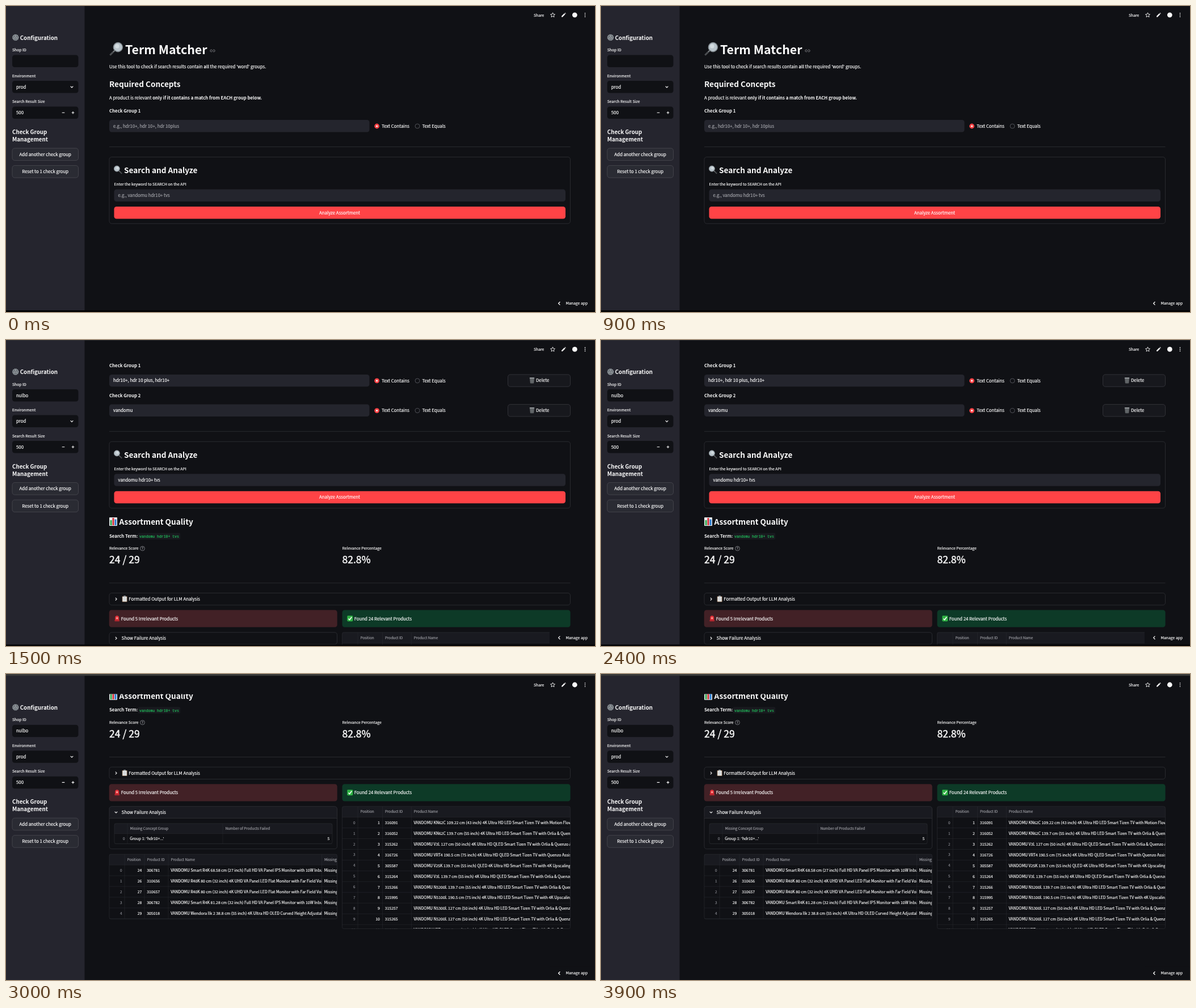
These frames come from a looping animation (1038x540 px, 4500 ms). An HTML page:

```html
<!DOCTYPE html>
<html lang="en">
<head>
<meta charset="utf-8">
<title>Term Matcher</title>
<style>
html, body { margin: 0; width: 100%; height: 100%; overflow: hidden; background: #101115; }
svg { display: block; width: 1038px; height: 540px; }
text { font-family: "Noto Sans CJK JP", "Noto Sans CJK SC", "Noto Sans CJK", "Open Sans", sans-serif; white-space: pre; }
text.code { font-family: "Liberation Mono", monospace; }
</style>
</head>
<body>
<svg id="stage" viewBox="0 0 1038 540" xmlns="http://www.w3.org/2000/svg"></svg>
<script>
const BG = '#101115', SIDE = '#25252e', FIELD = '#24252d', LINE = '#3a3b40', PANEL = '#191a20';
const WHITE = '#fafafa', GREY = '#a0a1a7', RED = '#ff4346', GREEN = '#21c05c';
const BODY = 7.8, SMALL = 6.82, CELL = 6.9, COLHEAD = 6.35, HEAD = 13.6, SIDEHEAD = 9.75;
const LOOP = 4500, STEP = 1500;
const BRAND = 'vandomu', QUERY = BRAND + ' hdr10+ tvs';

// Text is placed by the middle of its capitals; regular weight gets a thin outline.
const text = (x, cy, s, size = BODY, { w = 400, fill = WHITE, a = 'start', cls = '' } = {}) =>
  `<text class="${cls}" x="${x}" y="${(cy + size * .367).toFixed(2)}" font-size="${size}" font-weight="${w}" fill="${fill}" stroke="${fill}" stroke-width="${w > 400 ? 0 : size * .025}" text-anchor="${a}">${s}</text>`;
const bold = s => `<tspan font-weight="700" stroke-width="0">${s}</tspan>`;
const box = (x1, y1, x2, y2, fill = 'none', stroke = 'none', r = 4.3) =>
  `<rect x="${x1}" y="${y1}" width="${x2 - x1}" height="${y2 - y1}" rx="${r}" fill="${fill}" stroke="${stroke}" stroke-width=".6"/>`;
const line = (x1, y1, x2, y2, stroke = LINE, w = .6) =>
  `<path d="M${x1} ${y1}L${x2} ${y2}" stroke="${stroke}" stroke-width="${w}"/>`;
const path = (d, stroke = WHITE, w = 1.1, fill = 'none') =>
  `<path d="${d}" fill="${fill}" stroke="${stroke}" stroke-width="${w}" stroke-linejoin="round"/>`;
const circle = (x, y, r, fill, stroke = 'none', w = .7) =>
  `<circle cx="${x}" cy="${y}" r="${r}" fill="${fill}" stroke="${stroke}" stroke-width="${w}"/>`;
const at = (x, y, s, kx = 1, ky = kx) => `<g transform="translate(${x} ${y}) scale(${kx} ${ky})">${s}</g>`;
const clip = (id, x1, y1, x2, y2, s) =>
  `<clipPath id="${id}"><rect x="${x1}" y="${y1}" width="${x2 - x1}" height="${y2 - y1}"/></clipPath><g clip-path="url(#${id})">${s}</g>`;
const rule = y => line(182, y, 994.5, y);

const icons = {
  gear: circle(0, 0, 4.7, '#6f757a', '#8d9499', 1.2) +
    '<circle r="5.3" fill="none" stroke="#8d9499" stroke-width="1.1" stroke-dasharray="1.4 1.37"/>' +
    path('M0 0V-4M0 0L3.5 2M0 0L-3.5 2', '#a8aeb3', .9) + circle(0, 0, 1.7, '#a8aeb3') + circle(0, 0, .8, SIDE),
  lens: line(-10.5, 10.5, -4, 4, '#4a4d50', 3) + line(-4.5, 4.5, -2.5, 2.5, '#8b9094', 1.8) +
    circle(3.3, -3.3, 7.9, '#b9c4cb', '#7d858a', 1.4) + circle(1.8, -5, 3.6, '#d3dce0'),
  chart: box(0, 0, 14, 15, '#e9eef0', 'none', .8) + box(1.5, 5, 4.6, 14, '#35a853', 'none', .2) +
    box(5.5, 1, 8.5, 14, '#d9343d', 'none', .2) + box(9.5, 3.5, 12.6, 14, '#2b7bd0', 'none', .2),
  board: box(0, 1, 9, 11, '#8b6a4e', 'none', .8) + box(.8, 1.8, 8.2, 10.3, '#e6e8e8', 'none', .2) +
    box(2.6, 0, 6.4, 2.2, '#9aa0a3', 'none', .5) + path('M2 4.5H7M2 6.3H7M2 8.1H7', '#aeb2b5', .5),
  siren: path('M1.3 8V4A3.4 3.7 0 0 1 8.1 4V8Z', 'none', 0, '#e5333b') + box(.3, 7.6, 9.1, 10.3, '#b3262e', 'none', 1) +
    circle(4.7, 4.4, 1.5, '#ffb0a6'),
  check: box(0, 0, 10, 10, '#2fb344', 'none', 1.4) + path('M2.2 5.2L4.2 7.5L7.9 2.3', '#fff', 1.5),
  bin: path('M1 2.5H8L7.2 10.5H1.8Z', '#85898c', .6, '#4d5154') + path('M3 3V10M4.5 3V10M6 3V10M1.4 5H7.6M1.6 7.5H7.4', '#85898c', .4) +
    box(.2, .7, 8.8, 2.5, '#9da1a4', 'none', .8),
  down: path('M-2.3 -1.2L0 1.2L2.3 -1.2'),
  right: path('M-1.2 -2.3L1.2 0L-1.2 2.3'),
  left: path('M1.4 -2.8L-1.4 0L1.4 2.8', WHITE, 1.3),
  star: path('M0 -4L1.2 -1.3L4 -1L1.9 .9L2.5 3.7L0 2.2L-2.5 3.7L-1.9 .9L-4 -1L-1.2 -1.3Z', WHITE, .9),
  pencil: path('M-3.6 3.6V1.9L1.2 -2.9L2.9 -1.2L-1.9 3.6ZM1.8 -3.5L2.6 -4.1L4.1 -2.6L3.5 -1.8Z', 'none', 0, WHITE),
  link: path('M-.9 -1.8H-2.4A1.8 1.8 0 0 0 -2.4 1.8H-.9M.9 -1.8H2.4A1.8 1.8 0 0 1 2.4 1.8H.9M-1.6 0H1.6', '#8e8f94', .8)
};

function button(x1, y1, x2, label) {
  return box(x1, y1, x2, y1 + 21.5, '#2a2b33', '#54555c') + text((x1 + x2) / 2, y1 + 10.7, label, BODY, { a: 'middle' });
}

function sidebar(shop) {
  const field = y => box(11, y, 127.5, y + 21.5, BG);
  return `<rect y="-4" width="138.5" height="541" fill="${SIDE}"/>` +
    at(16.8, 55.5, icons.gear) + text(24.7, 56, 'Configuration', SIDEHEAD, { w: 600 }) +
    text(11, 77.5, 'Shop ID', SMALL) + field(86.5) + text(18, 97.3, shop) +
    text(11, 123, 'Environment', SMALL) + field(132) + text(18, 142.8, 'prod') + at(116, 142.8, icons.down) +
    text(11, 168.5, 'Search Result Size', SMALL) + field(177.5) + text(18, 188.2, '500') +
    path('M98.7 188.2H103.3M115.7 188.2H120.3M118 185.9V190.5') +
    text(11, 222.7, 'Check Group', SIDEHEAD, { w: 600 }) + text(11, 235.7, 'Management', SIDEHEAD, { w: 600 }) +
    button(11, 251, 127.5, 'Add another check group') + button(11, 281.5, 127.5, 'Reset to 1 check group');
}

const toolbar = () => text(930, 16, 'Share', SMALL) + at(963.5, 15.8, icons.star) + at(982.7, 15.8, icons.pencil) +
  circle(1002.3, 15.8, 4.4, WHITE) + [-3, 0, 3].map(d => circle(1020.5, 15.8 + d, .85, WHITE)).join('');

const manage = () => box(958, 513, 1038, 537, BG, 'none', 2) + at(975, 524.8, icons.left) + text(986.5, 524.8, 'Manage app', SMALL);

// Fixed parts of the page, shifted with the window.
const page = (d, shop, main) => `<rect width="1038" height="540" fill="${BG}"/>` + main +
  at(0, d, sidebar(shop) + toolbar() + manage() + '<rect y="537" width="1038" height="4" fill="#040405"/>') +
  (d ? `<rect width="1038" height="${d}" fill="#393a39"/>` : '');

function group(y, n, value, hint) {
  return text(182, y, 'Check Group ' + n, BODY, { w: 600 }) + box(182, y + 15.6, 640.5, y + 37, FIELD) +
    text(189, y + 26.3, value || hint, BODY, { fill: value ? WHITE : GREY }) +
    circle(653.6, y + 26.6, 4.4, RED) + circle(653.6, y + 26.6, 1.6, WHITE) + text(662, y + 26.6, 'Text Contains') +
    circle(725, y + 26.6, 4, 'none', '#6b6c73') + text(733.5, y + 26.6, 'Text Equals') +
    (value ? box(884.5, y + 15.6, 994.5, y + 37, '#17181d', '#45464c') + at(922.5, y + 20.3, icons.bin) + text(934, y + 26.3, 'Delete') : '');
}

const search = (value, hint) => rule(248.5) + box(182, 266.5, 994.5, 384, 'none', LINE) +
  at(197.5, 289.2, icons.lens, -.64, .64) + text(208, 290.5, 'Search and Analyze', HEAD, { w: 600 }) +
  text(190.5, 314.6, 'Enter the keyword to SEARCH on the API', SMALL) + box(190.5, 323.5, 986, 345, FIELD) +
  text(197.5, 334.3, value || hint, BODY, { fill: value ? WHITE : GREY }) +
  box(190.5, 354, 986, 375.5, RED) + text(588, 364.7, 'Analyze Assortment', BODY, { a: 'middle' });

function table(id, xs, y, bottom, heads, rows, h = 18.95) {
  const left = xs[0], right = xs[xs.length - 1], grid = '#2b2c32';
  let s = `<rect x="${left}" y="${y}" width="${right - left}" height="${h}" fill="${PANEL}"/>`;
  heads.forEach((name, i) => {
    s += clip(`${id}h${i}`, xs[i + 1], y, xs[i + 2], bottom, text(xs[i + 1] + 4.4, y + h / 2, name, COLHEAD, { fill: GREY }));
  });
  rows.forEach((row, r) => {
    const cy = y + h * (r + 1.5) + .2;
    s += text(xs[1] - 4.4, cy, r, COLHEAD, { fill: '#8c8d94', a: 'end' });
    row.forEach((v, i) => {
      const num = typeof v === 'number';
      const cell = text(num ? xs[i + 2] - 4.6 : xs[i + 1] + 4.2, cy, v, CELL, { a: num ? 'end' : 'start' });
      s += clip(`${id}${r}c${i}`, xs[i + 1], y, xs[i + 2], bottom, cell);
    });
    s += line(left, y + h * (r + 2), right, y + h * (r + 2), grid, .5);
  });
  s += line(left, y + h, right, y + h, grid, .5);
  xs.slice(1, -1).forEach(x => s += line(x, y, x, bottom, grid, .5));
  return clip(id, left, y, right, bottom, s) + box(left, y, right, bottom, 'none', '#2e2f35', 3);
}

const relevant = [
  [316091, 'KN62C', '109.22', 43, 'LED', 'Motion Flowmaxer'],
  [316052, 'KN62C', '139.7', 55, 'LED'],
  [315262, 'V3L', '127', 50, 'QLED'],
  [316726, 'VRT4', '190.5', 75, 'QLED', 'Quenzo Assistant'],
  [305587, 'V25K', '139.7', 55, 'QLED', '4K Upscaling (2024)'],
  [315264, 'V3L', '139.7', 55, 'QLED'],
  [315266, 'N5200L', '139.7', 55, 'LED'],
  [315995, 'N5100L', '190.5', 75, 'LED', '4K Upscaling'],
  [315257, 'N5300L', '127', 50, 'LED'],
  [315265, 'N5200L', '127', 50, 'LED'],
  [315270, 'VRT4', '139.7', 55, 'QLED']
].map(([id, model, cm, inch, panel, extra = 'Orlia &amp; Quenzo Assistant'], i) => {
  const kind = model === 'V25K' ? 'QLED 4K Ultra HD' : `4K Ultra HD ${panel}`;
  return [i + 1, String(id), `${BRAND.toUpperCase()} ${model} ${cm} cm (${inch} inch) ${kind} Smart Tizen TV with ${extra}`];
});

const irrelevant = [
  [24, '306781', 'Smart R4K 68.58 cm (27 inch) Full HD VA Panel IPS Monitor with 10W Inbuilt Speakers'],
  [26, '310656', 'R40K 80 cm (32 inch) 4K UHD VA Panel LED Flat Monitor with Far Field Voice Control'],
  [27, '310657', 'R40K 80 cm (32 inch) 4K UHD VA Panel LED Flat Monitor with Far Field Voice Control'],
  [28, '306782', 'Smart R4K 81.28 cm (32 inch) Full HD VA Panel IPS Monitor with 10W Inbuilt Speakers'],
  [29, '305018', 'Wendora Ilk 2 38.8 cm (55 inch) 4K Ultra HD OLED Curved Height Adjustable Monitor']
].map(([pos, id, name]) => [pos, id, `${BRAND.toUpperCase()} ${name}`, 'Missing Group']);

function results(open) {
  const failure = open
    ? box(182, 516, 583.5, 536.8, PANEL) + box(182, 516, 583.5, 591, 'none', LINE) + line(182, 536.8, 583.5, 536.8) +
      at(194, 526.3, icons.down) +
      table('why', [191, 214, 382, 575], 546.2, 581.8, ['Missing Concept Group', 'Number of Products Failed'], [["Group 1: 'hdr10+...'", 5]], 17.8) +
      table('bad', [182, 209, 244, 286, 556.5, 583.5], 600.4, 714.6, ['Position', 'Product ID', 'Product Name', 'Missing Groups'], irrelevant)
    : box(182, 516, 583.5, 537.2, 'none', LINE) + at(194, 526.3, icons.right);
  return at(182, 313, icons.chart) + text(199.5, 321, 'Assortment Quality', HEAD, { w: 600 }) +
    text(182, 345.7, 'Search Term:', BODY, { w: 600 }) + box(232.8, 340.5, 307.2, 352, '#191a1f', 'none', 2) +
    text(235, 346.6, QUERY, 6.48, { fill: GREEN, cls: 'code' }) +
    text(182, 367.7, 'Relevance Score', SMALL) + circle(240.5, 367.9, 3.9, 'none', GREY) + text(240.5, 368, '?', 5.6, { a: 'middle', fill: '#c0c1c6' }) +
    text(182, 388, '24 / 29', 17.55) + text(592.5, 367.7, 'Relevance Percentage', SMALL) + text(592.5, 388, '82.8%', 17.55) +
    rule(428.8) + box(182, 446.5, 994.5, 467.8, 'none', LINE) + at(194, 457.2, icons.right) +
    at(204.6, 451.2, icons.board) + text(216.3, 457, 'Formatted Output for LLM Analysis') +
    box(181.7, 476.6, 583.7, 506.8, '#422126') + at(191, 486.3, icons.siren) + text(202.8, 491.7, 'Found 5 Irrelevant Products') +
    box(592.5, 476.6, 994.6, 506.8, '#0d3a27') + at(601.3, 486.5, icons.check) + text(613.7, 491.7, 'Found 24 Relevant Products') +
    failure + text(203.8, 526.3, 'Show Failure Analysis') +
    table('good', [592.5, 620, 663.5, 714.3, 994.5], 516, 731.8, ['Position', 'Product ID', 'Product Name'], relevant);
}

const start = () => page(0, '',
  at(194, 76, icons.lens, 1.02) + text(210, 77, 'Term Matcher', 21.4, { w: 700 }) + at(364, 79, icons.link) +
  text(182, 107, `Use this tool to check if search results contain ${bold('all')} the required 'word' groups.`) +
  text(182, 138, 'Required Concepts', HEAD, { w: 600 }) +
  text(182, 162.6, `A product is relevant ${bold('only if it contains a match from EACH group below.')}`) +
  group(185.4, 1, '', 'e.g., hdr10+, hdr 10+, hdr 10plus') + search('', `e.g., ${QUERY}`));

const filled = () => page(.6, 'nulbo',
  group(45.3, 1, 'hdr10+, hdr 10 plus, hdr10+') + group(98, 2, BRAND) + at(0, -87.2, search(QUERY)) + results(false));

const scrolled = () => page(3.2, 'nulbo', clip('view', 138, 35.4, 1038, 540, at(0, -282.3, results(true))));

const stage = document.getElementById('stage');
const scenes = [start, filled, scrolled];
let shown = -1;
function draw(ms) {
  const i = Math.floor((ms % LOOP) / STEP);
  if (i !== shown) stage.innerHTML = scenes[shown = i]();
}
const t0 = performance.now();
function tick() {
  draw(performance.now() - t0);
  requestAnimationFrame(tick);
}
tick();
</script>
</body>
</html>
```
